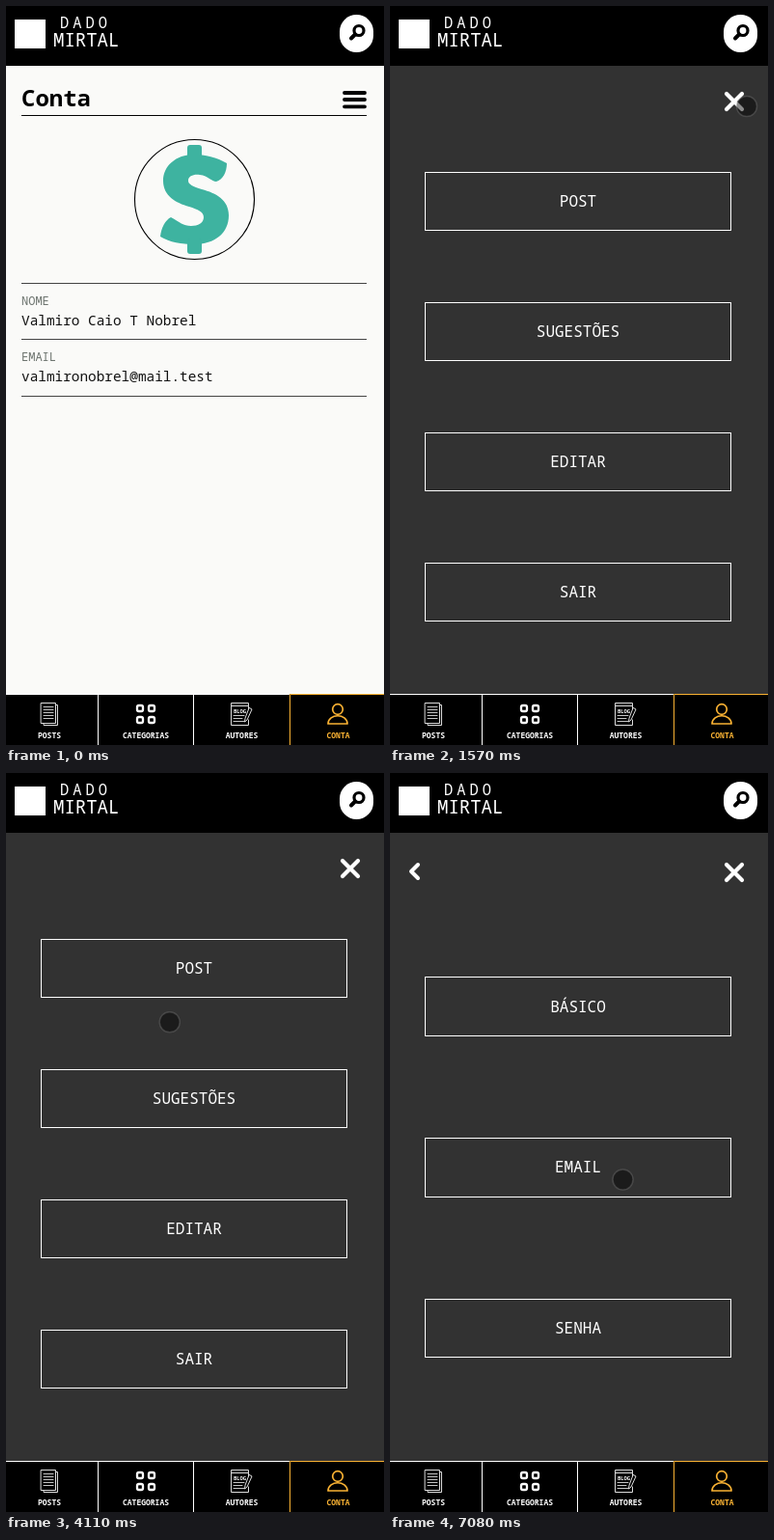
Animation of 392x766 px, one loop 8000 ms. Source, as an HTML page:

```html
<!DOCTYPE html>
<html lang="pt-BR">
<head>
<meta charset="utf-8">
<title>Conta</title>
<style>
  html, body { margin: 0; width: 100%; height: 100%; overflow: hidden; background: #fafaf8; }
  svg { display: block; width: 392px; height: 766px; }
  text { font-family: "Noto Sans Mono", "DejaVu Sans Mono", monospace; white-space: pre; }
  .mid { text-anchor: middle; }
  .tab { font-size: 8px; font-weight: 700; }
  .label { font-size: 12px; fill: #6d746f; }
  .value { font-size: 14.4px; font-weight: 300; fill: #111; }
  .button { font-size: 16px; font-weight: 500; fill: #fff; }
  .line { fill: none; stroke-linecap: round; stroke-linejoin: round; }
</style>
</head>
<body>
<svg viewBox="0 0 392 766">
  <rect width="392" height="766" fill="#fafaf8"/>

  <g id="account">
    <text x="16" y="104" font-size="24" font-weight="700">Conta</text>
    <path class="line" d="M351 90H372M351 97H372M351 104.3H372" stroke="#000" stroke-width="3.8"/>
    <path d="M16 113.5H374" stroke="#000"/>
    <circle cx="195.5" cy="200.5" r="62" fill="none" stroke="#000" stroke-width="1.1"/>
    <g fill="#3eb3a0">
      <path d="M229 163C219 157 206 154 195 154C176 154 163 166 163 181C163 197 176 204 190 208C199 211 205 213 205 219C205 225 199 228 192 228C184 228 180 224 171 219C165 222 161 230 160 239C170 245 182 247 195 247C217 247 231 235 231 217C231 201 218 194 203 190C194 187 189 185 189 181C189 176 195 174 201 175C210 176 213 182 218 182C225 180 229 172 229 163Z"/>
      <rect x="188" y="144" width="15" height="16" rx="3"/>
      <rect x="188" y="241" width="15" height="16" rx="3"/>
    </g>
    <path d="M16 287.5H374M16 345.5H374M16 404.5H374" stroke="#444"/>
    <text class="label" x="16" y="310">NOME</text>
    <text class="value" x="16" y="331">Valmiro Caio T Nobrel</text>
    <text class="label" x="16" y="368">EMAIL</text>
    <text class="value" x="16" y="389">valmironobrel@mail.test</text>
  </g>

  <g id="mainMenu"></g>
  <g id="editMenu"></g>

  <g id="header">
    <rect width="392" height="62"/>
    <rect x="9" y="14" width="32" height="30" fill="#fff"/>
    <g fill="#fff" font-weight="300">
      <text x="56" y="23" font-size="15.4" letter-spacing="4">DADO</text>
      <text x="49" y="42" font-size="19">MIRTAL</text>
    </g>
    <rect x="346" y="9" width="35" height="39" rx="17.5" fill="#fff"/>
    <g class="line" stroke="#000">
      <circle cx="366" cy="25.5" r="5" stroke-width="3.2"/>
      <path d="M362 29.5L358 33.5" stroke-width="4"/>
    </g>
  </g>

  <g id="tabs">
    <rect y="713" width="392" height="53"/>
    <path d="M0 713.5H294M95.5 714V766M194.5 714V766" stroke="#fff"/>
    <path d="M294.5 766V713.5H392" fill="none" stroke="#f9b233"/>
    <g class="line" stroke="#ddd" stroke-width="1">
      <path d="M36.5 722.5H51.5V743.5H36.5ZM52 724.5H53.5V745.5H39V744"/>
      <path d="M39 726.5H49M39 729.5H49M39 732.5H49M39 735.5H49M39 738.5H49" stroke-width=".9"/>
    </g>
    <g id="grid" class="line" stroke="#fff" stroke-width="2.3"></g>
    <g class="line" stroke="#ddd" stroke-width="1">
      <path d="M251.5 729V722.5H233.5V745.5H251.5V740M233.5 725.5H251.5"/>
      <path d="M236 735.5H247M236 738.5H245M236 741.5H248" stroke-width=".9"/>
      <path d="M252.5 727.5L255 729L250 740L247.5 742L248 738.5Z"/>
    </g>
    <text class="mid" x="242.5" y="732.5" font-size="5.5" font-weight="700" fill="#fff">BLOG</text>
    <g class="line" stroke="#f9b233" stroke-width="1.7">
      <circle cx="344" cy="729" r="5.3"/>
      <path d="M334 744C334 733 354 733 354 744Z"/>
    </g>
    <g class="tab mid" fill="#fff">
      <text x="45" y="759">POSTS</text>
      <text x="145" y="759">CATEGORIAS</text>
      <text x="244.5" y="759">AUTORES</text>
      <text x="344.5" y="759" fill="#f9b233">CONTA</text>
    </g>
  </g>

  <g id="cursor">
    <circle r="10.5" fill="#000" fill-opacity=".45" stroke="#808080" stroke-opacity=".35" stroke-width="1.5"/>
    <circle id="press" r="12" fill="#ff0" fill-opacity=".47"/>
  </g>
</svg>

<script>
const LOOP = 8000;
const $ = id => document.getElementById(id);

function buildMenu(id, labels, top, gap, height, closeY, hasBack) {
  const buttons = labels.map((label, i) => {
    const y = top + i * gap;
    const upper = Math.round(y), lower = Math.round(y + height);
    return `<rect x="36.5" y="${upper + .5}" width="317" height="${lower - upper - 1}" fill="none" stroke="#fff"/>
      <text class="button mid" x="195" y="${Math.round(y + height / 2 + 5.7)}">${label}</text>`;
  }).join("");
  const back = hasBack ? `<path d="M29 95L22 102L29 109" stroke-width="4"/>` : "";
  $(id).innerHTML = `<rect y="62" width="392" height="651" fill="#323232"/>${buttons}
    <g class="line" stroke="#fff">${back}
      <path d="M349 ${closeY - 8}l16 16m0 -16l-16 16" stroke-width="4.2"/></g>`;
}

buildMenu("mainMenu", ["POST", "SUGESTÕES", "EDITAR", "SAIR"], 172, 135, 61, 99, false);
buildMenu("editMenu", ["BÁSICO", "EMAIL", "SENHA"], 211.45, 166.6, 61.5, 103, true);

$("grid").innerHTML = [[136, 725], [148, 725], [136, 737], [148, 737]]
  .map(([x, y]) => `<rect x="${x}" y="${y}" width="6" height="6" rx="1.8"/>`).join("");

// Cursor path: time, x, y
const path = [
  [600, 346, 775], [660, 344, 754], [850, 333, 537], [1010, 368, 279], [1150, 373.5, 165],
  [1430, 370, 104], [1570, 370, 104], [2240, 254.5, 466.5], [2380, 254.5, 466.5],
  [2670, 120, 190], [3010, 48, 30.5], [3100, 48, 30.5], [3430, 38.5, 72.5], [3700, 35.5, 104],
  [3900, 35.5, 104], [4110, 169.5, 257.5], [4330, 204, 430], [4730, 207, 467], [4870, 207, 467],
  [5040, 197, 425], [5280, 191.5, 275], [5490, 191, 237.5], [6680, 191, 237.5],
  [7080, 241.5, 421.5], [8000, 241.5, 421.5]
];

// Each press opens the next screen on release.
const PRESS = 70;
const presses = [[1500, "mainMenu"], [2310, "editMenu"], [3760, "mainMenu"], [4800, "editMenu"]];

const slope = (i, axis) => (path[i + 1][axis] - path[i][axis]) / (path[i + 1][0] - path[i][0]);

// Harmonic mean keeps the curve from overshooting and rests at holds.
function tangent(i, axis) {
  if (i === 0 || i === path.length - 1) return 0;
  const a = slope(i - 1, axis), b = slope(i, axis);
  return a * b > 0 ? 2 * a * b / (a + b) : 0;
}

function position(t, axis) {
  let i = 0;
  while (i < path.length - 2 && t >= path[i + 1][0]) i++;
  const span = path[i + 1][0] - path[i][0];
  const u = Math.max(0, (t - path[i][0]) / span), v = 1 - u;
  return (1 + 2 * u) * v * v * path[i][axis] + u * v * v * span * tangent(i, axis)
    + u * u * (3 - 2 * u) * path[i + 1][axis] - u * u * v * span * tangent(i + 1, axis);
}

const show = (id, on) => $(id).setAttribute("display", on ? "inline" : "none");

function render(t) {
  const opened = presses.filter(([time]) => t >= time + PRESS).pop();
  const screen = opened ? opened[1] : "account";
  for (const id of ["account", "mainMenu", "editMenu"]) show(id, id === screen);
  show("cursor", t >= 660);
  show("press", presses.some(([time]) => t >= time && t < time + PRESS));
  $("cursor").setAttribute("transform", `translate(${position(t, 1)} ${position(t, 2)})`);
  $("cursor").setAttribute("opacity", t >= 5490 && t < 6420 ? .75 : 1);
}

const start = performance.now();
function tick() {
  render((performance.now() - start) % LOOP);
  requestAnimationFrame(tick);
}
render(0);
requestAnimationFrame(tick);
</script>
</body>
</html>
```
